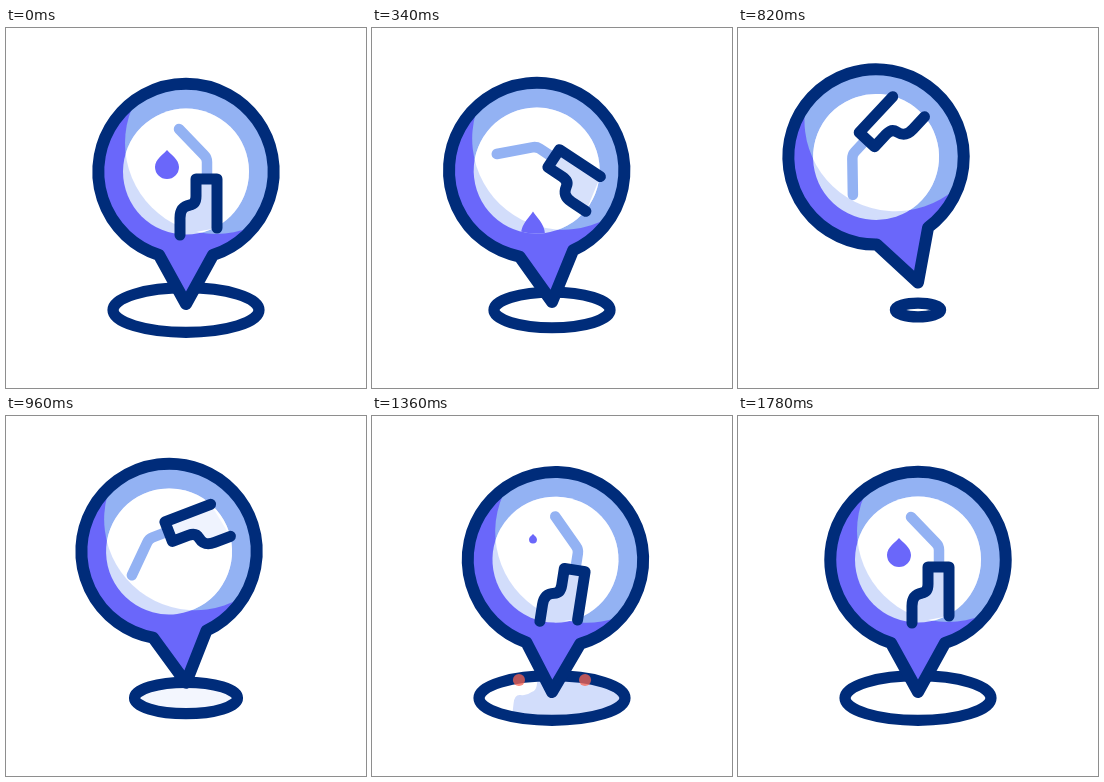
Write an HTML page that moves like this. It is 360 px wide and 360 px high and loops after 3000 ms.

```html
<!DOCTYPE html>
<html lang="en">
<head>
<meta charset="utf-8">
<title>Fuel station pin</title>
<style>
  html, body { margin: 0; width: 100%; height: 100%; overflow: hidden; background: #fff; }
  svg { display: block; width: 100%; height: 100%; }
  .line { fill: none; stroke: #002c7a; stroke-linecap: round; stroke-linejoin: round; }
  .purple { fill: #6a67fa; }
  .sky { fill: #93b2f3; }
  .pale { fill: #d2ddfb; }
</style>
</head>
<body>
<svg viewBox="0 0 360 360">
  <defs>
    <path id="outline" d="M180 276L153 227A87.7 87.7 0 1 1 207 227Z"/>
    <clipPath id="inPin"><use href="#outline"/></clipPath>
    <clipPath id="inDisc"><circle cx="180" cy="143.6" r="63"/></clipPath>
    <clipPath id="inGround"><ellipse id="groundClip" cx="180" cy="282"/></clipPath>
  </defs>

  <g clip-path="url(#inGround)">
    <path id="puddle" class="pale" d="M0 8V0L2 -17Q3 -26 9 -25T20 -28Q24 -29 25 -34L28 -54H170V8Z"/>
  </g>
  <ellipse id="ground" class="line" cx="180" cy="282" stroke-width="11.2"/>
  <g id="sparks" stroke="#fb6450" stroke-width="12" stroke-linecap="round">
    <line id="spark"/>
    <use href="#spark" transform="translate(360 0) scale(-1 1)"/>
  </g>

  <g id="pin">
    <use href="#outline" class="purple"/>
    <g clip-path="url(#inPin)"><circle class="sky" cx="210" cy="115" r="91"/></g>
    <g clip-path="url(#inDisc)">
      <circle class="pale" cx="180" cy="143.6" r="64"/>
      <circle fill="#fff" cx="210" cy="115" r="91"/>
      <path id="drop" class="purple" d="M0 0C3 4 12 9 12 17A12 12 0 0 1 -12 17C-12 9 -3 4 0 0Z"/>
    </g>
    <use href="#outline" class="line" stroke-width="12"/>
    <g id="nozzle">
      <path d="M173 101L198 127Q201 130 201 134V150" class="line" style="stroke:#93b2f3" stroke-width="10.5"/>
      <path id="nozzleFill" class="pale" d="M174 207V190C174 180 179 178 184 177Q190 176 190 168V151H211V200Z"/>
      <path class="line" stroke-width="11" d="M174 207V190C174 180 179 178 184 177Q190 176 190 168V151H211V200"/>
    </g>
  </g>
</svg>
<script>
const LOOP = 3000, STEP = 20, LAST = 89;
const el = id => document.getElementById(id);
const set = (id, attrs) => {
  for (const name in attrs) el(id).setAttribute(name, attrs[name]);
};

// Eased value at step n from [step, value] keys.
function track(n, ...keys) {
  if (n <= keys[0][0]) return keys[0][1];
  for (let i = 1; i < keys.length; i++) {
    const [a, from] = keys[i - 1], [b, to] = keys[i];
    if (n < b) {
      const u = (n - a) / (b - a);
      return from + (to - from) * u * u * (3 - 2 * u);
    }
  }
  return keys[keys.length - 1][1];
}

function drawGround(n) {
  const size = track(n, [4, 1], [40, 0.31], [43, 0.31], [53, 1.1], [60, 1]);
  const radii = { rx: 73 * size, ry: 22.3 * size };
  set('ground', radii);
  set('groundClip', radii);

  const sweep = Math.max(0, (n - 52) / 36);
  const slant = track(n, [54, -28], [68, 0]);
  set('puddle', {
    transform: `translate(${110 + 150 * sweep * sweep} 304) skewX(${slant})`,
    opacity: n >= 88 ? 0 : track(n, [46, 0], [52, 1])
  });

  const head = track(n, [49, 0], [59, 1]), tail = track(n, [50, 0], [62, 1]);
  set('spark', {
    x1: 172 - 25 * tail, y1: 279 - 15 * tail,
    x2: 172 - 25.1 * head, y2: 279 - 15 * head
  });
  set('sparks', { opacity: n < 50 ? 0 : track(n, [64, 1], [76, 0]) });
}

function drawPin(n) {
  const tilt = track(n, [0, 0], [42, -18.5], [54, 3.8], [61, -3.5], [68, 1.5], [76, 0]);
  const lift = track(n, [12, 0], [39, 21.5], [42, 21.5], [53, 0]);
  const spin = track(n, [4, 0], [33, -118.5], [44, -118.5], [63, 11], [76, 0]);
  set('pin', { transform: `translate(0 ${-lift}) rotate(${tilt} 180 276)` });
  set('nozzle', { transform: `rotate(${spin} 180.7 144.7)` });
  set('nozzleFill', { opacity: track(n, [14, 1], [28, 0], [44, 0], [54, 1]) });

  // The drop stays upright, so the pin's own motion is undone.
  const falling = n < 30;
  const y = falling ? track(n, [2, 122], [26, 212]) : track(n, [58, 116], [84, 122]);
  const width = falling ? 1 : track(n, [58, 0], [84, 1]);
  const height = falling ? track(n, [2, 1], [14, 1.35]) : width;
  set('drop', {
    transform: `rotate(${-tilt} 180 276) translate(161 ${y + lift}) scale(${width} ${height})`
  });
}

const start = performance.now();
function render() {
  const time = (performance.now() - start) % LOOP;
  const n = Math.min(LAST, Math.floor(time / STEP));
  drawGround(n);
  drawPin(n);
  requestAnimationFrame(render);
}
render();
</script>
</body>
</html>
```
